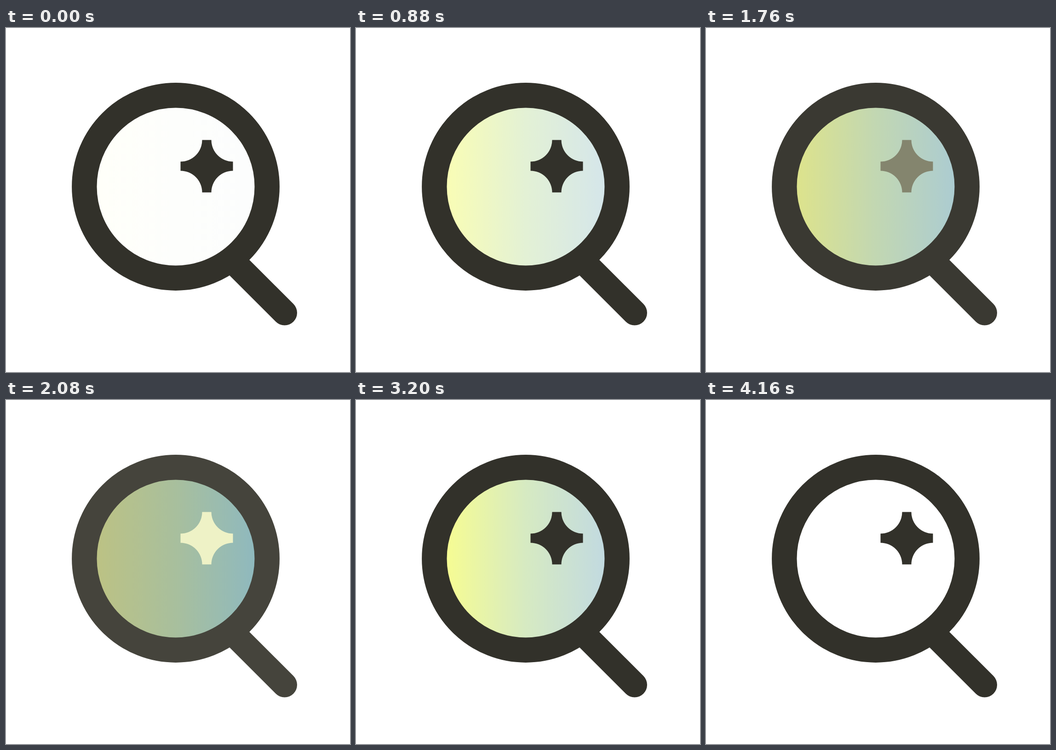
An HTML page for the animation above (4240 ms loop, 748x748 px).

```html
<!DOCTYPE html>
<html lang="en">
<head>
<meta charset="utf-8">
<title>Magnifier</title>
<style>
  html, body { margin: 0; width: 100%; height: 100%; overflow: hidden; background: #fff; }
  svg { display: block; width: 100vw; height: 100vh; }
</style>
</head>
<body>
<svg viewBox="0 0 748 748">
  <defs>
    <linearGradient id="tint" gradientUnits="userSpaceOnUse" x1="197" y1="0" x2="541" y2="0">
      <stop offset="0"/><stop offset=".5"/><stop offset="1"/>
    </linearGradient>
  </defs>
  <circle cx="369" cy="345" r="180" fill="url(#tint)"/>
  <g id="frame" fill="none" stroke-width="54.4" stroke-linecap="round">
    <circle cx="369" cy="345" r="198.7"/>
    <path d="M490 503.5L605.8 619.3"/>
  </g>
  <path id="star" d="M446.5 243.5a47 47 0 0 0 47 47v20a47 47 0 0 0-47 47h-20a47 47 0 0 0-47-47v-20a47 47 0 0 0 47-47z"/>
</svg>
<script>
const LOOP = 4240, STEP = 80;
const WHITE = [255, 255, 255], INK = [50, 49, 42], INK_LIT = [70, 69, 61], STAR_LIT = [250, 255, 208];
const LENS = [
  { light: [246, 252, 147], deep: [184, 190, 131] },
  { light: [214, 234, 194], deep: [165, 188, 155] },
  { light: [194, 218, 224], deep: [140, 183, 188] }
];

const stops = document.querySelectorAll('stop');
const frame = document.getElementById('frame');
const star = document.getElementById('star');

const mix = (a, b, p) => a.map((v, i) => v + (b[i] - v) * p);
const rgb = c => `rgb(${c.map(Math.round)})`;
const bezier = (a, b, u) => 3 * a * u * (1 - u) ** 2 + 3 * b * u * u * (1 - u) + u ** 3;

// cubic-bezier(.25, .1, .25, 1), solved by bisection
function ease(x) {
  if (x <= 0) return 0;
  if (x >= 1) return 1;
  let lo = 0, hi = 1;
  for (let i = 0; i < 24; i++) {
    const mid = (lo + hi) / 2;
    if (bezier(.25, .25, mid) < x) lo = mid; else hi = mid;
  }
  return bezier(.1, 1, lo);
}
const ramp = (t, start, length) => ease((t - start) / length);

function draw(t) {
  // the fade-out runs past the end of the loop; the last step is blank
  const fadeOut = t < 500 ? ramp(t + LOOP, 3525, 1000) : ramp(t, 3525, 1000);
  const fadeIn = t < 500 ? 1 : ramp(t, 560, 800);
  const tint = t >= LOOP - STEP ? 0 : fadeIn * (1 - fadeOut);
  const glow = ramp(t, 1580, 720) - ramp(t, 2620, 600);

  LENS.forEach(({ light, deep }, i) =>
    stops[i].setAttribute('stop-color', rgb(mix(WHITE, mix(light, deep, glow), tint))));
  frame.setAttribute('stroke', rgb(mix(INK, INK_LIT, glow)));
  star.setAttribute('fill', rgb(mix(INK, STAR_LIT, glow)));
}

let origin;
function tick(now) {
  origin ??= now;
  draw(Math.floor(((now - origin) % LOOP) / STEP) * STEP);
  requestAnimationFrame(tick);
}
draw(0);
requestAnimationFrame(tick);
</script>
</body>
</html>
```
